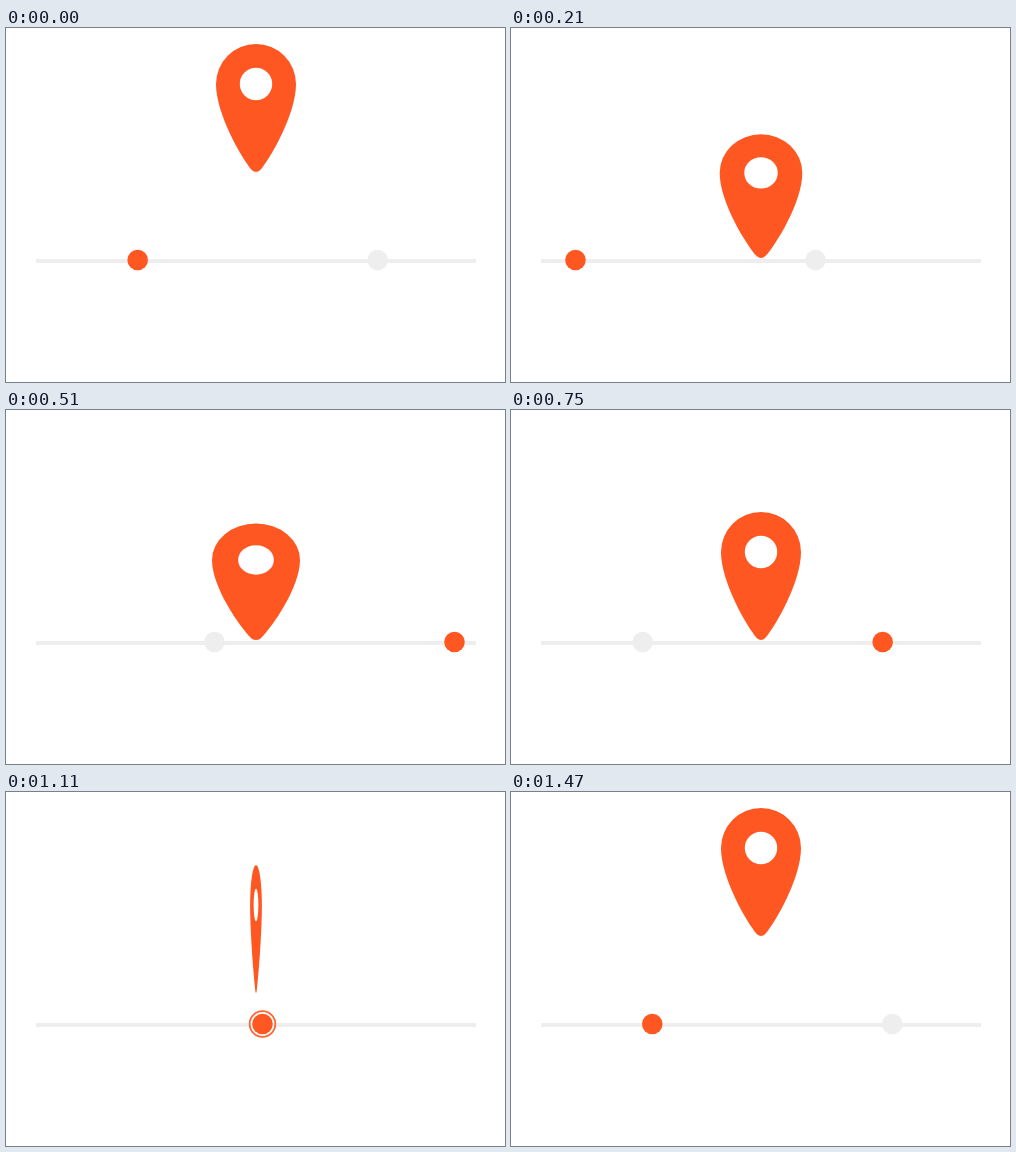
An HTML page that plays this animation: 499 px wide and 354 px high, repeating every 1500 ms.

```html
<!DOCTYPE html>
<html lang="en">
<head>
<meta charset="utf-8">
<title>Map pin loader</title>
<style>
  html, body { margin: 0; width: 100%; height: 100%; overflow: hidden; background: #fff; }
  svg { display: block; }
</style>
</head>
<body>
<svg width="499" height="354" viewBox="0 0 499 354" fill="#ff5722">
  <clipPath id="track"><rect x="30" y="190" width="440" height="84"/></clipPath>
  <g clip-path="url(#track)">
    <rect x="30" y="231" width="440" height="4" fill="#eee"/>
    <circle id="grayDot" cy="232" r="10.3" fill="#eee"/>
    <circle id="orangeDot" cy="232" r="10.3"/>
    <circle id="ripple" cy="232" fill="none" stroke="#ff5722" stroke-width="1.8"/>
  </g>
  <g id="pin">
    <path d="M-40-88a40 40 0 0 1 80 0C40-58 14.5-14 4.3-2Q0 2.2-4.3-2C-14.5-14-40-58-40-88z"/>
    <circle cy="-88" r="16.2" fill="#fff"/>
  </g>
</svg>
<script>
const LOOP = 1500, SPAN = 480, LIFT = -86;
const [grayDot, orangeDot, ripple, pin] =
  ['grayDot', 'orangeDot', 'ripple', 'pin'].map(id => document.getElementById(id));

// time, vertical offset, scale x, scale y
const poses = [
  [0, LIFT, 1, 1],
  [200, 0, 1, 1],
  [225, 0, 1.08, 0.92],
  [360, -11, 0.915, 1.09],
  [510, 0, 1.1, 0.91],
  [660, 0, 1, 1],
  [1033, 0, 1, 1],
  [1233, LIFT, 1, 1],
  [LOOP, LIFT, 1, 1]
];

const mix = (a, b, k) => a + (b - a) * k;
const progress = (t, start, length) => Math.min(1, Math.max(0, (t - start) / length));
const ease = x => x * x * (3 - 2 * x);

function poseAt(t) {
  const i = poses.findIndex(p => p[0] > t);
  const from = poses[i - 1], to = poses[i];
  const k = ease(progress(t, from[0], to[0] - from[0]));
  return from.map((v, n) => mix(v, to[n], k));
}

// Dots slide left and re-enter on the right
const slide = (x, t) => (x - SPAN * t / LOOP + SPAN) % SPAN;

function draw(now) {
  const t = now % LOOP;
  const orangeX = slide(132, t);
  // Positions just past zero are outside the track, so shift them to the right end
  const place = x => x < 15 ? x + SPAN : x;
  orangeDot.setAttribute('cx', place(orangeX));
  grayDot.setAttribute('cx', place(slide(372, t)));

  const wave = progress(t, 1035, 265);
  ripple.setAttribute('cx', orangeX);
  ripple.setAttribute('r', mix(9.8, 25, ease(wave)));
  ripple.setAttribute('opacity', wave > 0 ? 1 - wave ** 2 : 0);

  const [, y, sx, sy] = poseAt(t);
  const spin = Math.cos(2 * Math.PI * ease(progress(t, 1033, 253)));
  pin.setAttribute('transform', `translate(250 ${230 + y}) scale(${sx * spin} ${sy})`);
  requestAnimationFrame(() => draw(performance.now()));
}
draw(performance.now());
</script>
</body>
</html>
```
